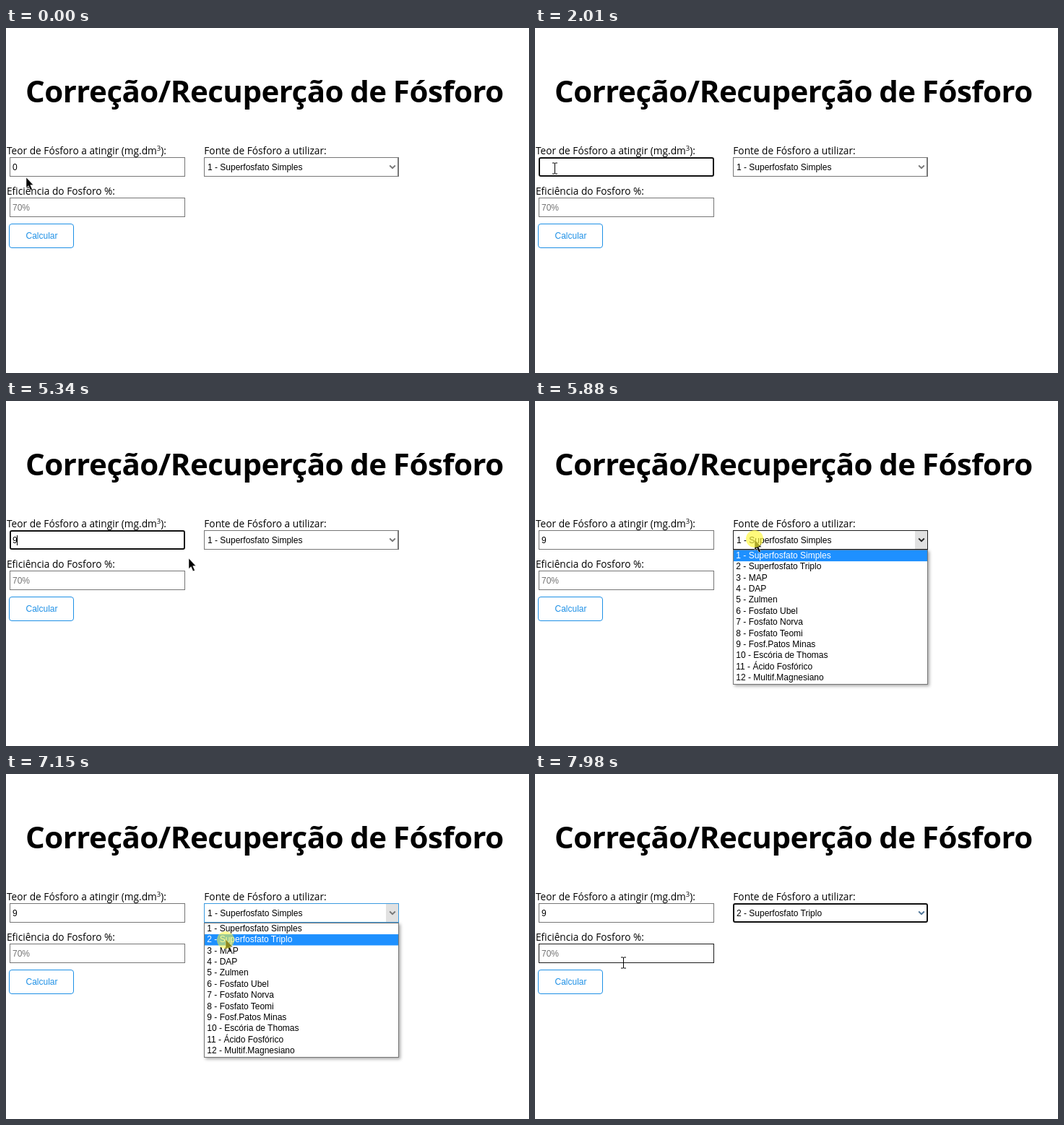
Write an HTML page that moves like this. It is 724 by 478 pixels and loops after 8000 ms.

```html
<!DOCTYPE html>
<html lang="pt">
<head>
<meta charset="utf-8">
<title>Correção de Fósforo</title>
<style>
html, body { margin: 0; width: 100%; height: 100%; overflow: hidden; background: #fff; }
svg { display: block; }
text { white-space: pre; }
.title { font: bold 42px "Open Sans", "Noto Sans", sans-serif; letter-spacing: -.5px; word-spacing: -1.2px; }
.label { font: 13.7px "Open Sans", "Noto Sans", sans-serif; }
.ui { font: 12px "Liberation Sans", Arial, sans-serif; }
.box { fill: #fff; stroke: #767676; }
.box.hover { stroke: #1c1c1c; }
.box.open { stroke: #3b9be0; }
.box.focus { stroke: #101010; stroke-width: 2; }
#list rect.frame { fill: #fff; stroke: #767676; filter: drop-shadow(2px 2px 2px rgba(0,0,0,.35)); }
</style>
</head>
<body>
<svg width="724" height="478" viewBox="0 0 724 478">
  <text class="title" x="27" y="103">Correção/Recuperção de Fósforo</text>
  <text class="label" x="1" y="175">Teor de Fósforo a atingir (mg.dm<tspan font-size="9.5" dy="-5">3</tspan><tspan dy="5">):</tspan></text>
  <text class="label" x="274.3" y="175">Fonte de Fósforo a utilizar:</text>
  <text class="label" x="1" y="231">Eficiência do Fosforo %:</text>

  <rect id="level"/>
  <text id="value" class="ui" x="9" y="197"></text>
  <path id="caret" d="M14.5 186V200" stroke="#000"/>

  <rect id="eff"/>
  <text class="ui" x="9" y="253" fill="#757575">70%</text>

  <rect x="4.5" y="271.5" width="89" height="33" rx="3.5" fill="#fff" stroke="#1e90e6"/>
  <text class="ui" x="27.5" y="292" fill="#1e90e6">Calcular</text>

  <rect id="select"/>
  <path id="edge" d="M543 179V206" stroke="#767676" stroke-width="2"/>
  <rect id="arrowBg" x="526" y="180" width="17" height="25" fill="#e1e1e1"/>
  <path id="chevron" d="M531.2 190.5L535 194.2L538.8 190.5" fill="none" stroke-width="1.8"/>
  <text id="choice" class="ui" x="279" y="197"></text>

  <g id="list">
    <rect class="frame" x="274.5" y="206.5" width="269" height="186"/>
    <rect id="bar" x="275" width="268" height="15.4" fill="#1e90ff"/>
  </g>

  <path id="arrow" d="M0 -1V13.4L3.2 10.6L5.9 16.8L8.4 15.7L5.7 9.6H9.8Z" stroke="#fff" stroke-width=".5"/>
  <path id="beam" d="M-3.5 -7.5H-1Q0 -7.5 0 -6.5Q0 -7.5 1 -7.5H3.5M0 -6.5V6.5M-3.5 7.5H-1Q0 7.5 0 6.5Q0 7.5 1 7.5H3.5" fill="none" stroke="#000"/>
  <circle id="click" r="12" fill="#fff83c"/>
</svg>
<script>
const LOOP = 8000;
const ROW = 15.37;
const TOP = 206.7;
const OPTIONS = ['Superfosfato Simples', 'Superfosfato Triplo', 'MAP', 'DAP', 'Zulmen',
  'Fosfato Ubel', 'Fosfato Norva', 'Fosfato Teomi', 'Fosf.Patos Minas',
  'Escória de Thomas', 'Ácido Fosfórico', 'Multif.Magnesiano'];

// time, x, y, shape
const POINTER = [
  [0, 28, 208, 'arrow'], [70, 27.5, 198, 'beam'], [140, 27.5, 194.5, 'beam'],
  [5060, 38.5, 194.5, 'beam'], [5130, 84.5, 196.5, 'beam'], [5200, 150, 207, 'arrow'],
  [5270, 214, 215, 'arrow'], [5340, 253, 219, 'arrow'], [5410, 274, 217, 'arrow'],
  [5480, 288, 210, 'arrow'], [5590, 297, 203, 'arrow'], [5660, 302, 197, 'arrow'],
  [5750, 304, 193, 'arrow'],
  [6410, 304, 195, 'arrow'], [6480, 304, 201, 'arrow'], [6550, 304, 208, 'arrow'],
  [6620, 304, 214, 'arrow'], [6690, 304, 220, 'arrow'], [6760, 304, 226, 'arrow'],
  [6890, 304, 230, 'arrow'],
  [7630, 297, 232, 'arrow'], [7700, 268, 239, 'arrow'], [7770, 226.5, 247.5, 'beam'],
  [7840, 178.5, 255.5, 'beam'], [7910, 141.5, 260.5, 'beam'], [7980, 122.5, 261.5, 'beam']
];
// time, caret x (0 = hidden)
const CARET = [[0, 0], [400, 14.5], [920, 0], [1390, 0], [1460, 8.5], [2010, 0], [2540, 8.5],
  [3070, 0], [3600, 8.5], [4000, 14.5], [4530, 0], [5060, 15.5], [5590, 0]];
const VALUE = [[0, '0'], [1390, ''], [4000, '9']];
// time, x, y, opacity
const CLICK = [[0, 0, 0, 0], [400, 27.5, 194, .6], [530, 0, 0, 0],
  [5880, 304, 191, .68], [5950, 0, 0, 0], [7150, 304, 230, .55], [7280, 0, 0, 0]];

const $ = id => document.getElementById(id);
const at = (steps, t) => steps.findLast(s => s[0] <= t);
const show = (id, on) => $(id).style.display = on ? '' : 'none';
const set = (id, attrs) => {
  for (const k in attrs) $(id).setAttribute(k, attrs[k]);
};
const move = (id, x, y) => set(id, { transform: `translate(${x} ${y})` });
const option = i => `${i + 1} - ${OPTIONS[i]}`;

function field(id, x, y, w, state) {
  const p = state === 'focus' ? 1 : .5;
  set(id, { class: 'box ' + state, x: x + p, y: y + p, width: w - 2 * p, height: 27 - 2 * p,
    rx: state === 'focus' ? 2 : 0 });
}

const rows = OPTIONS.map((_, i) => {
  const row = document.createElementNS('http://www.w3.org/2000/svg', 'text');
  row.setAttribute('class', 'ui');
  row.setAttribute('x', 278.3);
  row.setAttribute('y', Math.round(218 + i * ROW));
  row.textContent = option(i);
  $('list').append(row);
  return row;
});

function draw(t) {
  const [, px, py, shape] = at(POINTER, t);
  for (const id of ['arrow', 'beam']) show(id, id === shape);
  move(shape, px, py);

  const open = t >= 5880 && t < 7280;
  const done = t >= 7280;
  const focused = t >= 400 && t < 5880;
  field('level', 5, 179, 243, focused ? 'focus' : shape === 'beam' && py < 206 ? 'hover' : '');
  field('eff', 5, 235, 243, shape === 'beam' && py > 235 ? 'hover' : '');
  const over = t >= 5660 && t < 5950;
  field('select', 274, 179, 270, done ? 'focus' : over ? 'hover' : open ? 'open' : '');
  show('edge', !open && !done);
  show('arrowBg', open || over);
  set('chevron', { stroke: done ? '#4d7396' : over ? '#222' : '#767676' });

  $('value').textContent = at(VALUE, t)[1];
  const caret = at(CARET, t)[1];
  show('caret', caret);
  move('caret', caret - 14.5, 0);

  $('choice').textContent = option(done ? 1 : 0);
  show('list', open);
  const active = py > TOP + ROW ? 1 : 0;
  set('bar', { y: TOP + active * ROW });
  rows.forEach((row, i) => row.setAttribute('fill', i === active ? '#fff' : '#000'));

  const [, cx, cy, alpha] = at(CLICK, t);
  set('click', { cx, cy, opacity: alpha });
}

const start = performance.now();
function tick() {
  draw((performance.now() - start) % LOOP);
  requestAnimationFrame(tick);
}
tick();
</script>
</body>
</html>
```
